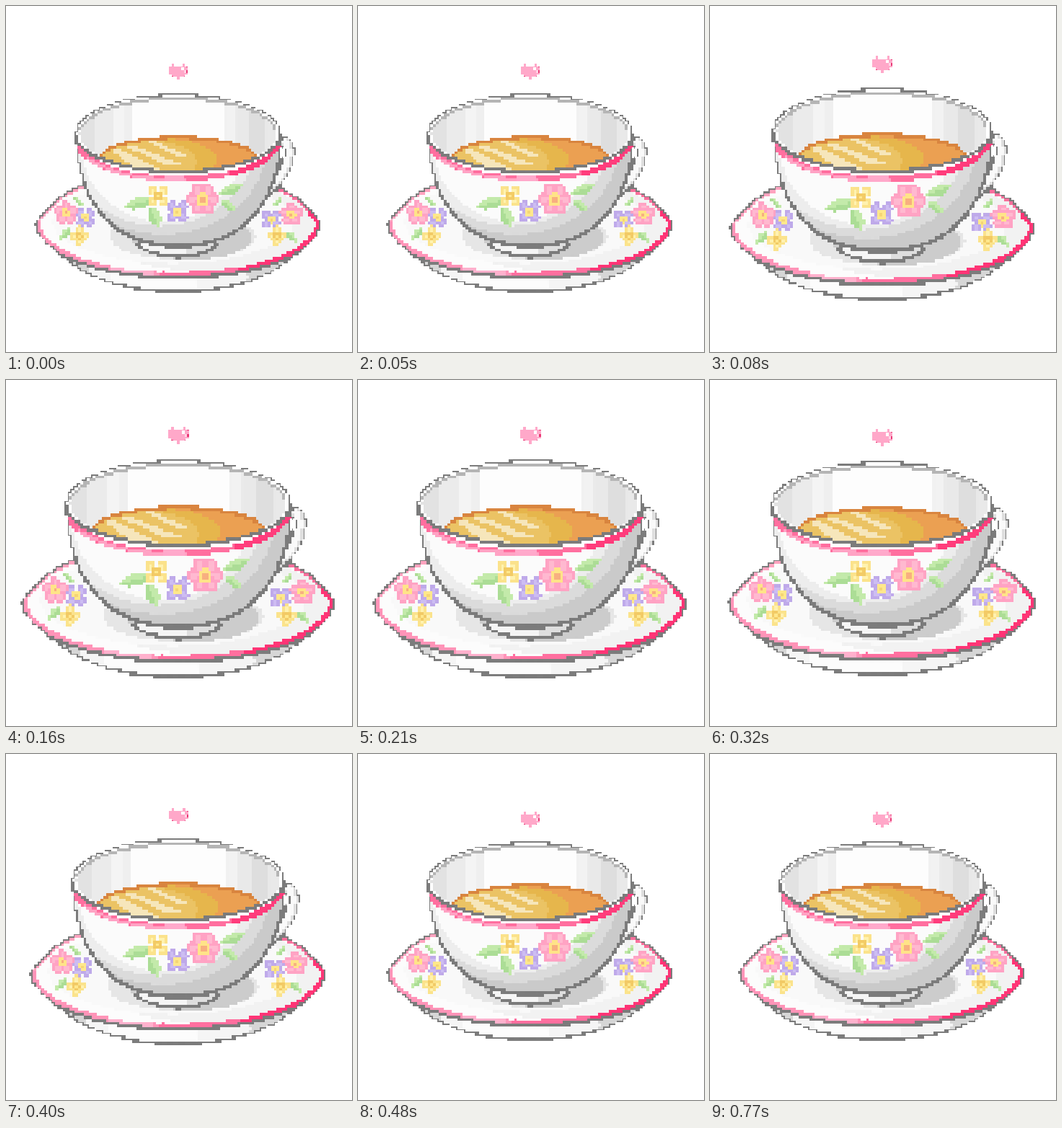
Recreate the animation shown at these times as an HTML page with a canvas. Size 480 px wide and 480 px high, loop 0.96 s.

```html
<!DOCTYPE html>
<html lang="en">
<head>
<meta charset="utf-8">
<title>Teacup</title>
<style>
  html, body { margin: 0; width: 100%; height: 100%; overflow: hidden; background: #fff; }
  canvas { display: block; }
</style>
</head>
<body>
<canvas id="stage" width="480" height="480"></canvas>
<script>
const SIZE = 480, GRID = 128, CELL = SIZE / GRID, SHIFT = 0.75;
const STEP = 80, LOOP = 960;
const SCALES = [1, 1.068, 1.098, 1.088, 1.078, 1.035, 1];
const LINE = '#7c7c7c';

function layer(size) {
  const c = document.createElement('canvas');
  c.width = c.height = size;
  const g = c.getContext('2d', { willReadFrequently: true });
  g.imageSmoothingEnabled = false;
  return g;
}
const sprite = layer(GRID), scratch = layer(GRID), sheet = layer(SIZE);

// Paints a path in stage units as hard-edged cells; a width strokes it.
function paint(d, color, width = 0, ...clips) {
  const g = scratch;
  g.clearRect(0, 0, GRID, GRID);
  g.save();
  g.scale(1 / CELL, 1 / CELL);
  g.translate(SHIFT, SHIFT);
  for (const c of clips) g.clip(new Path2D(c));
  g.fillStyle = g.strokeStyle = color;
  g.lineWidth = width;
  if (width) g.stroke(new Path2D(d)); else g.fill(new Path2D(d));
  g.restore();
  const img = g.getImageData(0, 0, GRID, GRID);
  for (let i = 3; i < img.data.length; i += 4) img.data[i] = img.data[i] > 112 ? 255 : 0;
  g.putImageData(img, 0, 0);
  sprite.drawImage(g.canvas, 0, 0);
}

const oval = (x, y, rx, ry = rx) =>
  `M${x - rx} ${y}a${rx} ${ry} 0 1 0 ${2 * rx} 0a${rx} ${ry} 0 1 0 ${-2 * rx} 0z`;
const box = (x, y, w, h) => `M${x} ${y}h${w}v${h}h${-w}z`;

function leaf(x, y, dx, dy, bulge) {
  const mx = x + dx / 2, my = y + dy / 2, len = Math.hypot(dx, dy);
  const nx = -dy / len * bulge, ny = dx / len * bulge;
  const start = `M${x} ${y}Q`, end = `${x + dx} ${y + dy}`;
  paint(`${start}${mx + nx} ${my + ny} ${end}Q${mx - nx} ${my - ny} ${x} ${y}`, '#c3eaaa');
  paint(`${start}${mx + nx} ${my + ny} ${end}z`, '#acdd96');
}

const PINK = ['#ffa3c4', '#ffb9d0', '#ffe488', '#f8b080'];
const PURPLE = ['#bfaaea', '#cdbdf2', '#ffe88c', '#f5d676'];
const YELLOW = ['#fbe38c', '#fff2b0', '#f3cb66', '#ffe88c'];

function flower(x, y, r, petals, turn, [base, light, core, dot]) {
  for (const [size, color] of [[0.43, base], [0.22, light]])
    for (let i = 0; i < petals; i++) {
      const a = turn + i * 2 * Math.PI / petals;
      paint(oval(x + Math.cos(a) * r * 0.64, y + Math.sin(a) * r * 0.64, r * size), color);
    }
  paint(oval(x, y, r * 0.4), core);
  paint(oval(x, y, r * 0.18), dot);
}
const UP = -Math.PI / 2, DIAGONAL = Math.PI / 4;

function saucer() {
  const base = 'M52 322Q110 397 239 397Q368 397 426 322z';
  paint(base, '#d6d6d6');
  paint(oval(225, 375, 110, 50), '#f5f5f5', 0, base);
  paint(oval(205, 380, 60, 50), '#fcfcfc', 0, base);
  paint(base, LINE, 4);

  const plate = 'M40 301C60 268 100 228 239 228C378 228 418 268 438 301'
    + 'C434 345 350 377 239 377C128 377 44 345 40 301z';
  paint(plate, '#fcfcfc');
  paint(oval(275, 306, 158, 62), '#f2f2f2', 0, plate);
  paint(oval(232, 299, 168, 58), '#f9f9f9', 0, plate);

  const rim = (color, width, ...area) => paint(plate, color, width, plate, box(...area));
  rim('#ffa3bf', 11, 35, 225, 205, 76);
  rim('#ff94b8', 14, 35, 301, 205, 80);
  rim('#ffb1cd', 14, 145, 340, 60, 40);
  rim('#ff6f9f', 15, 215, 340, 105, 40);
  rim('#fa6f9c', 11, 370, 225, 70, 60);
  rim('#ff3576', 15, 320, 285, 120, 95);
  paint(plate, LINE, 4);

  paint(oval(245, 320, 101, 31), '#e6e6e6');
  paint(oval(258, 321, 84, 30), '#cccccc');

  leaf(93, 265, 14, 13, 7);
  leaf(74, 325, 16, -17, 9);
  flower(110, 294, 14, 4, DIAGONAL, PURPLE);
  flower(83, 287, 16, 5, UP, PINK);
  flower(102, 319, 13, 4, 0, YELLOW);

  leaf(369, 278, 15, -12, 7);
  leaf(389, 312, 16, 16, 9);
  flower(368, 296, 14, 4, DIAGONAL, PURPLE);
  flower(396, 289, 16, 5, UP, PINK);
  flower(376, 319, 13, 4, 0, YELLOW);
}

function handle() {
  const curve = 'M372 189Q394 181 394 204Q391 238 360 257';
  paint(curve, LINE, 18);
  paint(curve, '#dedede', 11);
  paint('M374 188Q392 182 392 204Q389 236 360 254', '#fafafa', 7);
}

function cup() {
  const foot = 'M188 322L183 332Q198 347 239 347.5Q279 347 293 332L288 322z';
  paint(foot, '#f5f5f5');
  paint(box(250, 310, 50, 40), '#dedede', 0, foot);
  paint(foot, LINE, 4);

  const body = 'M96 180C98 262 140 333 239 333C338 333 380 262 382 180z';
  paint(body, '#cacaca');
  paint(oval(218, 192, 144, 125), '#dbdbdb', 0, body);
  paint(oval(213, 190, 134, 115), '#ededed', 0, body);
  paint(oval(217, 188, 114, 111), '#fbfbfb', 0, body);
  paint(body, LINE, 4);

  // Lip and inner wall
  const mouth = oval(239, 176, 143, 54), wall = oval(239, 178, 137, 50);
  paint(oval(239, 182, 142, 56), '#fff');
  paint(mouth, '#fff');
  paint(wall, '#fdfdfd');
  const bands = [[100, 22, '#e2e2e2'], [122, 27, '#ebebeb'], [149, 16, '#f4f4f4'],
    [165, 10, '#efefef'], [304, 16, '#f2f2f2'], [320, 18, '#e9e9e9'],
    [338, 22, '#dedede'], [360, 20, '#e9e9e9']];
  for (const [x, w, color] of bands) paint(box(x, 120, w, 110), color, 0, wall);
  paint(wall, '#b5b5b5', 3.6, box(90, 110, 300, 62));

  tea(mouth);
  paint(mouth, LINE, 4);

  const band = oval(239, 184, 141, 56), front = box(90, 194, 300, 60);
  const hull = [body, front];
  paint(band, '#ff6f9f', 7, ...hull);
  paint(oval(239, 186, 140, 56), '#ffa3c4', 4, ...hull, box(110, 200, 140, 50));
  paint(band, '#ffa9cb', 7, box(222, 200, 26, 50));
  paint(band, '#ff3d7c', 7, ...hull, box(310, 190, 80, 50));

  leaf(163, 280, 41, -12, 15);
  leaf(199, 279, 14, 27, 17);
  leaf(295, 261, 34, -13, 14);
  leaf(297, 268, 22, 18, 12);
  flower(238, 285, 16.5, 4, DIAGONAL, PURPLE);
  flower(211, 264, 15.5, 4, DIAGONAL, YELLOW);
  flower(273, 268, 21.5, 6, 0, PINK);
}

function tea(mouth) {
  const pool = oval(239, 215, 110, 33);
  paint(pool, '#eba052', 0, mouth);
  paint(oval(210, 214, 83, 31), '#e6b64c', 0, mouth, pool);
  paint(oval(192, 218, 72, 32), '#ebc364', 0, mouth, pool);
  paint('M146 200h14l58 29h-34zM165 194h12l72 27h-24zM195 188h10l50 20h-16z',
    '#f6e6bb', 0, mouth, pool);
  paint(pool, '#d9853f', 4, mouth, box(120, 175, 240, 35));
}

function heart() {
  paint('M239 107L223 92V84L229 80H235L239 85L243 80H250L256 85V92z', '#ffa8c9');
  for (const [x, y] of [[223, 84], [227, 80], [235, 84], [250, 81], [252, 88], [228, 96], [247, 96]])
    paint(box(x, y, CELL, CELL), '#e83a77');
  paint(box(243, 86, 4, 4), '#fff');
  paint(box(247, 89, 4, 4), '#ffd2e5');
}

saucer();
handle();
cup();
heart();

// Trims half a cell off the silhouette for a finer outer line.
sheet.drawImage(sprite.canvas, 0, 0, SIZE, SIZE);
sheet.globalCompositeOperation = 'destination-in';
for (const dx of [-2, 2])
  for (const dy of [-2, 2]) sheet.drawImage(sprite.canvas, dx, dy, SIZE, SIZE);

const view = document.getElementById('stage').getContext('2d');
function draw() {
  const step = Math.floor(performance.now() % LOOP / STEP);
  const s = SCALES[Math.min(step, SCALES.length - 1)];
  const corner = SIZE / 2 - SHIFT - SIZE / 2 * s;
  view.imageSmoothingEnabled = false;
  view.fillStyle = '#fff';
  view.fillRect(0, 0, SIZE, SIZE);
  view.drawImage(sheet.canvas, corner, corner, SIZE * s, SIZE * s);
  requestAnimationFrame(draw);
}
draw();
</script>
</body>
</html>
```
